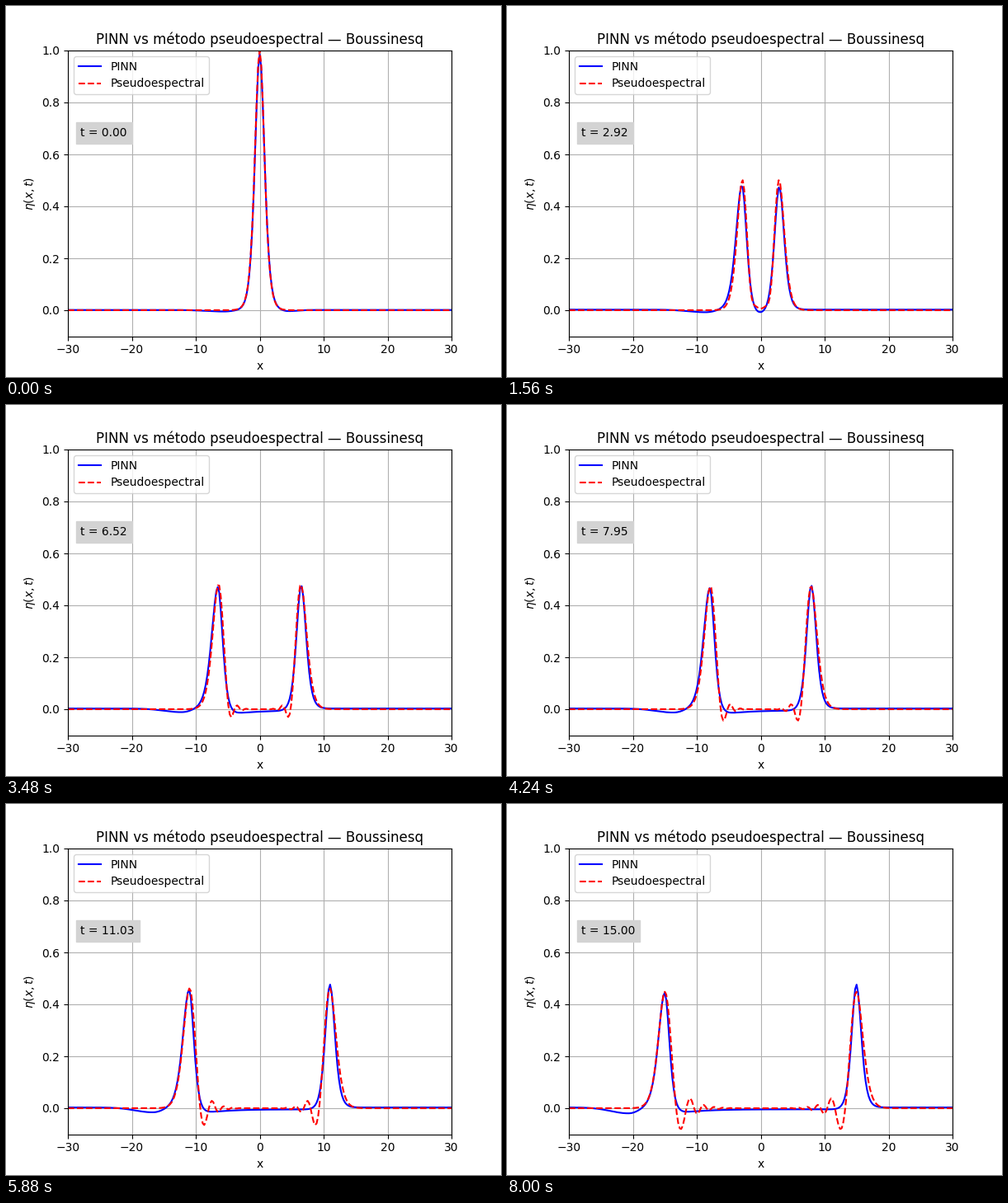
Write a matplotlib script that moves like this. It is 600x450 px and loops after 8040 ms.

```python
import numpy as np
import matplotlib.pyplot as plt
from matplotlib.animation import FuncAnimation

ALPHA = BETA = 0.1
L, N, FRAMES, T_END = 30, 256, 201, 15
SUBSTEPS = 3

times = np.linspace(0, T_END, FRAMES)
grid = np.linspace(-L, L, N, endpoint=False)
x = np.append(grid, L)
k2 = (2 * np.pi * np.fft.fftfreq(N, 2 * L / N)) ** 2


def sech2(z):
    return 1 / np.cosh(z) ** 2


def accel(eta):
    """eta_tt for eta_tt = (eta + 1.5 a eta^2)_xx + b/3 eta_xxtt."""
    flux = np.fft.fft(eta + 1.5 * ALPHA * eta**2)
    return np.fft.ifft(-k2 * flux / (1 + BETA / 3 * k2)).real


def rhs(state):
    return np.array([state[1], accel(state[0])])


def solve():
    state = np.array([sech2(grid), np.zeros(N)])
    dt = times[1] / SUBSTEPS
    waves = [state[0]]
    for _ in times[1:]:
        for _ in range(SUBSTEPS):
            a = rhs(state)
            b = rhs(state + dt / 2 * a)
            c = rhs(state + dt / 2 * b)
            d = rhs(state + dt * c)
            state = state + dt / 6 * (a + 2 * b + 2 * c + d)
        waves.append(state[0])
    return [np.append(w, w[0]) for w in waves]


def pulse(z, amp, w_left, w_right):
    return amp * sech2(z / np.where(z < 0, w_left, w_right))


def bump(z, w_left, w_right):
    return np.exp(-((z / np.where(z < 0, w_left, w_right)) ** 2))


def gate(z):
    return 0.5 * (1 + np.tanh(z))


def pinn(t):
    """Network prediction: two pulses plus slowly varying offsets."""
    grow = 1 - np.exp(-t / 2)
    base = 0.001 + 0.002 * (1 - np.exp(-t / 3))
    left = pulse(x + t, 0.492 - 0.0031 * t, 1 + 0.33 * grow, 1 - 0.04 * grow)
    right = pulse(x - t + 0.04 * grow, 0.475 + 0.018 * np.exp(-t), 0.98, 1.03)
    ahead = -(0.005 + base + 0.001 * t) * bump(x + t + 5.6, 4.0, 2.2)
    inside = gate(x + t - 1) * gate(t - x - 1)
    middle = -inside * (0.004 + 0.026 * np.exp(-(x + t) / 4)
                        + 0.004 * np.exp(-(t - x) / 2.5))
    start = -0.005 * np.exp(-t) * bump(x - 4.3, 1.2, 2)
    return left + right + ahead + middle + start + base * (1 - inside)


waves = solve()

fig, ax = plt.subplots(figsize=(6, 4.5), dpi=100)
line_pinn, = ax.plot([], [], "b-", label="PINN")
line_spec, = ax.plot([], [], "r--", label="Pseudoespectral")
clock = ax.text(-28, 0.67, "",
                bbox=dict(facecolor="lightgray", edgecolor="lightgray"))
ax.set_xlim(-L, L)
ax.set_ylim(-0.1, 1.0)
ax.set_xlabel("x")
ax.set_ylabel(r"$\eta(x,t)$")
ax.set_title("PINN vs método pseudoespectral — Boussinesq")
ax.legend(loc="upper left")
ax.grid(True)


def update(i):
    line_pinn.set_data(x, pinn(times[i]))
    line_spec.set_data(x, waves[i])
    clock.set_text(f"t = {times[i]:.2f}")
    return line_pinn, line_spec, clock


anim = FuncAnimation(fig, update, frames=FRAMES, interval=40, repeat=True,
                     repeat_delay=0)
plt.show()
```
